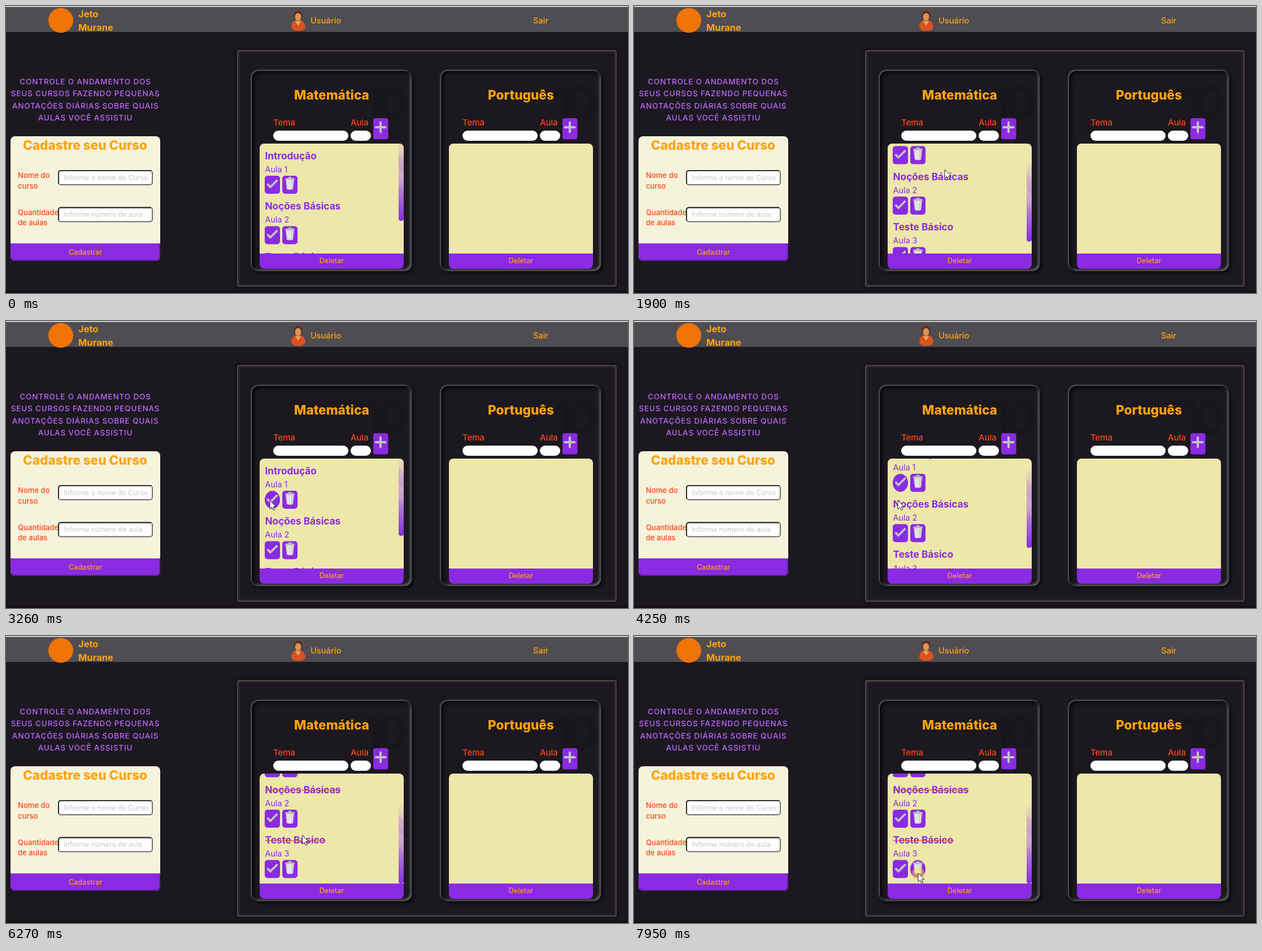
Write an HTML page that moves like this. It is 1101x509 px and loops after 8 s.

```html
<!DOCTYPE html>
<html lang="pt">
<head>
<meta charset="utf-8">
<title>Cursos</title>
<style>
  html, body { margin: 0; width: 100%; height: 100%; overflow: hidden; background: #1c1820; }
  .panel, .card { position: absolute; box-sizing: border-box; }
  .panel {
    left: 409px; top: 78px; width: 672px; height: 420px; border-radius: 4px;
    border: 2px solid; border-color: #54463c #4b403c #4b4646 #4c4a50;
    box-shadow: 0 0 7px #08060a, inset 0 0 4px #4a474e;
  }
  .card {
    top: 115px; width: 283px; height: 355px; border-radius: 13px;
    box-shadow: -1px -1px 3px #85828a, 3px 3px 6px #08060a,
      inset 3px 3px 6px #050406, inset -2px -2px 4px #77747c;
  }
  svg { position: absolute; left: 0; top: 0; font-family: Inter, "Open Sans", sans-serif; }
  .orange { fill: #ffa30f; }
  .red { fill: #ff4517; }
  .purple { fill: #8a2be2; }
  .bold { font-weight: 700; }
  .mid { text-anchor: middle; }
  .intro { fill: #bd69ff; font-size: 13.5px; font-weight: 450; letter-spacing: .85px; }
  .label { font-size: 13.1px; font-weight: 450; }
  .hint { font-size: 12.4px; fill: #c9c9cd; }
  .action { font-size: 12.6px; font-weight: 450; }
  .nav { font-size: 14.7px; font-weight: 450; }
  .head { font-size: 22.6px; font-weight: 800; }
  .field { font-size: 14.9px; font-weight: 450; }
  .lesson { font-size: 14.4px; }
  .topic { font-size: 17.2px; }
  .ghost { font-size: 80px; font-weight: 600; fill: #19151c; letter-spacing: -9px; }
  .strike { stroke: #e8443a; stroke-width: 1.3; }
</style>
</head>
<body>
<div class="panel"></div>
<div class="card" style="left:435px"></div>
<div class="card" style="left:770px"></div>

<svg width="1101" height="509" viewBox="0 0 1101 509">
  <defs>
    <clipPath id="view"><path d="M449 439V252a8 8 0 0 1 8-8H696a8 8 0 0 1 8 8V439Z"/></clipPath>
    <linearGradient id="fade" x1="0" y1="0" x2="0" y2="1">
      <stop offset="0" stop-color="#ead9b4"/>
      <stop offset=".5" stop-color="#c79fd0"/>
      <stop offset="1" stop-color="#8a2be2"/>
    </linearGradient>
    <g id="check"><path d="M4.500 14.500l5.500 5.500L22.500 7.500" fill="none" stroke="#c4bfc6" stroke-width="3.800"/></g>
    <g id="bin">
      <path d="M6 6h15l-2 18q-5.500 2-11 0Z" fill="#d6d4d2"/>
      <path d="M10 8l1 15M14 8v15" stroke="#efeeec" stroke-width="2"/>
      <path d="M5 5q8.500-3 17 0v2H5ZM11 2h5v2h-5Z" fill="#bcb9b7"/>
    </g>
    <g id="course">
      <text class="ghost" x="633" y="200">10</text>
      <text class="field red" x="473" y="212">Tema</text>
      <text class="field red" x="610" y="212">Aula</text>
      <rect x="473" y="221" width="133" height="18" rx="9" fill="#fff"/>
      <rect x="610" y="221" width="36" height="18" rx="9" fill="#fff"/>
      <rect class="purple" x="650" y="199" width="26.500" height="37.500" rx="4"/>
      <path d="M654.500 215h17M663 206.500v17" stroke="#c4bfc6" stroke-width="4" stroke-linecap="round"/>
      <path d="M449 439V252a8 8 0 0 1 8-8H696a8 8 0 0 1 8 8V439Z" fill="#ede7aa"/>
      <path d="M449 439H704V458a8 8 0 0 1-8 8H457a8 8 0 0 1-8-8Z"/>
      <text class="action orange mid" x="576.500" y="456">Deletar</text>
    </g>
  </defs>

  <rect width="1101" height="2" fill="#f4f4f4"/>
  <rect y="1.500" width="1101" height="44.500" fill="#4f4d52"/>
  <rect y="505" width="1101" height="4" fill="#150f16"/>
  <circle cx="97" cy="25.500" r="22" fill="#f07305"/>
  <g class="orange">
    <g class="bold" font-size="16.500"><text x="128" y="19.500">Jeto</text><text x="128" y="43.500">Murane</text></g>
    <text class="nav" x="539" y="31">Usuário</text>
    <text class="nav" x="933" y="31">Sair</text>
  </g>
  <path d="M505 36q1-11 12-11t13 11q0 8-12.500 8T505 36Z" fill="#d9531f"/>
  <path d="M512 27h10l-5 8Z" fill="#e8a566"/>
  <ellipse cx="517" cy="17.500" rx="8" ry="9" fill="#5a2a26"/>
  <ellipse cx="517" cy="19.500" rx="5.500" ry="7" fill="#dd9354"/>

  <g class="intro mid">
    <text x="140.500" y="139">CONTROLE O ANDAMENTO DOS</text>
    <text x="140.500" y="160.300">SEUS CURSOS FAZENDO PEQUENAS</text>
    <text x="140.500" y="181.500">ANOTAÇÕES DIÁRIAS SOBRE QUAIS</text>
    <text x="140.500" y="202.800">AULAS VOCÊ ASSISTIU</text>
  </g>

  <rect x="8" y="231" width="265" height="221" rx="8" fill="#f5f3dc"/>
  <path class="purple" d="M8 421H273V444a8 8 0 0 1-8 8H16a8 8 0 0 1-8-8Z"/>
  <path d="M272 422V444a7 7 0 0 1-7 7H16a7 7 0 0 1-6-4" fill="none" stroke="#6520a8" stroke-width="2"/>
  <text class="head orange mid" x="140" y="255">Cadastre seu Curso</text>
  <text class="action orange mid" x="140.500" y="441">Cadastrar</text>
  <g class="label red">
    <text x="21" y="305">Nome do</text><text x="21" y="323.500">curso</text>
    <text x="21" y="370.500">Quantidade</text><text x="21" y="389">de aulas</text>
  </g>
  <g fill="#fff" stroke="#707070" stroke-width="2">
    <rect x="93" y="292" width="166" height="25" rx="4"/>
    <rect x="93" y="357.500" width="166" height="25" rx="4"/>
  </g>
  <path d="M93 315V296a4 4 0 0 1 4-4H257M93 380.500V361.500a4 4 0 0 1 4-4H257" fill="none" stroke="#2c2c30" stroke-width="2"/>
  <text class="hint" x="102" y="308.500">Informe o nome do Curso</text>
  <text class="hint" x="102" y="374">Informe número de aula</text>

  <use id="math" href="#course" fill="#8a2be2"/>
  <use href="#course" x="335" fill="#8a2be2"/>
  <text class="head orange mid" x="576.500" y="166">Matemática</text>
  <text class="head orange mid" x="911.500" y="166">Português</text>

  <g clip-path="url(#view)">
    <g id="items"></g>
    <g id="thumb">
      <rect x="695" y="244" width="9" height="137" rx="4" fill="url(#fade)"/>
      <path d="M695 260l9 9v28l-9-9ZM695 317l9 9v50l-9-9Z" fill="#8a2be2" opacity=".14"/>
    </g>
  </g>

  <circle id="press" r="10.500" fill="#ffea3c" fill-opacity=".5"/>
  <path id="cursor" d="M0 0V15.500L3.600 12.200 6 17.600 8.600 16.500 6.300 11.200H11Z" fill="#fff" stroke="#26222a"/>
</svg>

<script>
const $ = id => document.getElementById(id);
const LOOP = 8000, MAX = 82.5, PITCH = 89.4;

// Bursts of repainting: first, last, count
const bursts = [
  [670, 1430, 12], [1830, 2040, 4], [2300, 2510, 4], [2770, 3260, 8],
  [3590, 3720, 2], [4180, 4390, 4], [4650, 4920, 4], [5180, 5940, 11],
  [6070, 6670, 10], [6870, 7620, 12], [7950, 7950, 1]
];
const ticks = bursts.flatMap(([a, b, n]) =>
  Array.from({ length: n }, (_, i) => Math.round((a + (b - a) * i / Math.max(1, n - 1)) / 10) * 10));

// Each wheel turn flips between top and bottom of the list
const wheels = [1220, 1810, 2280, 2750, 4160, 6450, 6850];

// Pointer path: time, x, y
const path = [
  [670, 1028, 479], [1210, 550, 289], [1830, 550, 289], [2040, 550, 294],
  [2980, 550, 294], [3260, 467, 318], [4600, 467, 318], [4740, 467, 325],
  [5180, 467, 325], [5640, 470, 408], [6070, 470, 408], [6420, 560, 318],
  [7080, 560, 318], [7360, 522, 446], [7620, 503, 420.5]
];
const presses = [[3590, 3720], [4740, 4920], [5790, 5940], [7950, LOOP]];
const done = [3720, 4920, 5940];
const hovers = { check0: [3180, 4650], check1: [4650, 5300], check2: [5550, 6130], bin2: [7540, LOOP] };

const within = (t, [a, b]) => t >= a && t < b;
const smooth = x => { x = Math.min(1, Math.max(0, x)); return x * x * (3 - 2 * x); };

const button = (icon, i, x, y) => `<g transform="translate(${x} ${y})">
  <rect id="${icon}${i}" class="purple" width="27" height="32" rx="5"/><use href="#${icon}"/></g>`;

$('items').innerHTML = ['Introdução', 'Noções Básicas', 'Teste Básico'].map((name, i) => `
  <g transform="translate(0 ${i * PITCH})">
    <text id="topic${i}" class="topic bold purple" x="458.500" y="271.800">${name}</text>
    <path id="strike${i}" class="strike"/>
    <text class="lesson purple" x="458.500" y="295">Aula ${i + 1}</text>
    ${button('check', i, 458, 301)}${button('bin', i, 489, 301)}
  </g>`).join('');

function scrollAt(t) {
  let y = 0;
  wheels.forEach((w, i) => { y += (i % 2 ? -MAX : MAX) * smooth((t - w) / 220); });
  return y;
}

function pointAt(t) {
  const i = path.findIndex(p => p[0] > t);
  if (i < 0) return path[path.length - 1].slice(1);
  const [a, x, y] = path[i - 1], [b, u, v] = path[i];
  const k = smooth((t - a) / (b - a));
  return [x + (u - x) * k, y + (v - y) * k];
}

const move = (id, x, y) => $(id).setAttribute('transform', `translate(${x} ${y})`);
const show = (id, on) => $(id).setAttribute('visibility', on ? 'visible' : 'hidden');

function draw(now) {
  const clock = now % LOOP;
  const t = ticks.reduce((last, tick) => tick <= clock ? tick : last, 0);
  const y = scrollAt(t), visible = t >= path[0][0];
  move('items', 0, -y);
  move('thumb', 0, y * 58 / MAX);
  show('cursor', visible);
  show('press', presses.some(p => within(t, p)));
  if (visible) {
    const [px, py] = pointAt(t);
    move('cursor', px, py);
    move('press', px, py);
    const overDelete = px > 449 && px < 704 && py > 439 && py < 466;
    $('math').setAttribute('fill', overDelete ? '#7a22cc' : '#8a2be2');
  }
  done.forEach((d, i) => {
    const end = 459 + $('topic' + i).getComputedTextLength();
    $('strike' + i).setAttribute('d', `M458.500 266.500H${end}`);
    show('strike' + i, t >= d);
  });
  for (const id in hovers) {
    const on = within(t, hovers[id]);
    $(id).setAttribute('rx', on ? 13.5 : 5);
    $(id).setAttribute('ry', on ? 16 : 5);
  }
}

const start = performance.now();
function frame() {
  draw(performance.now() - start);
  requestAnimationFrame(frame);
}
frame();
</script>
</body>
</html>
```
